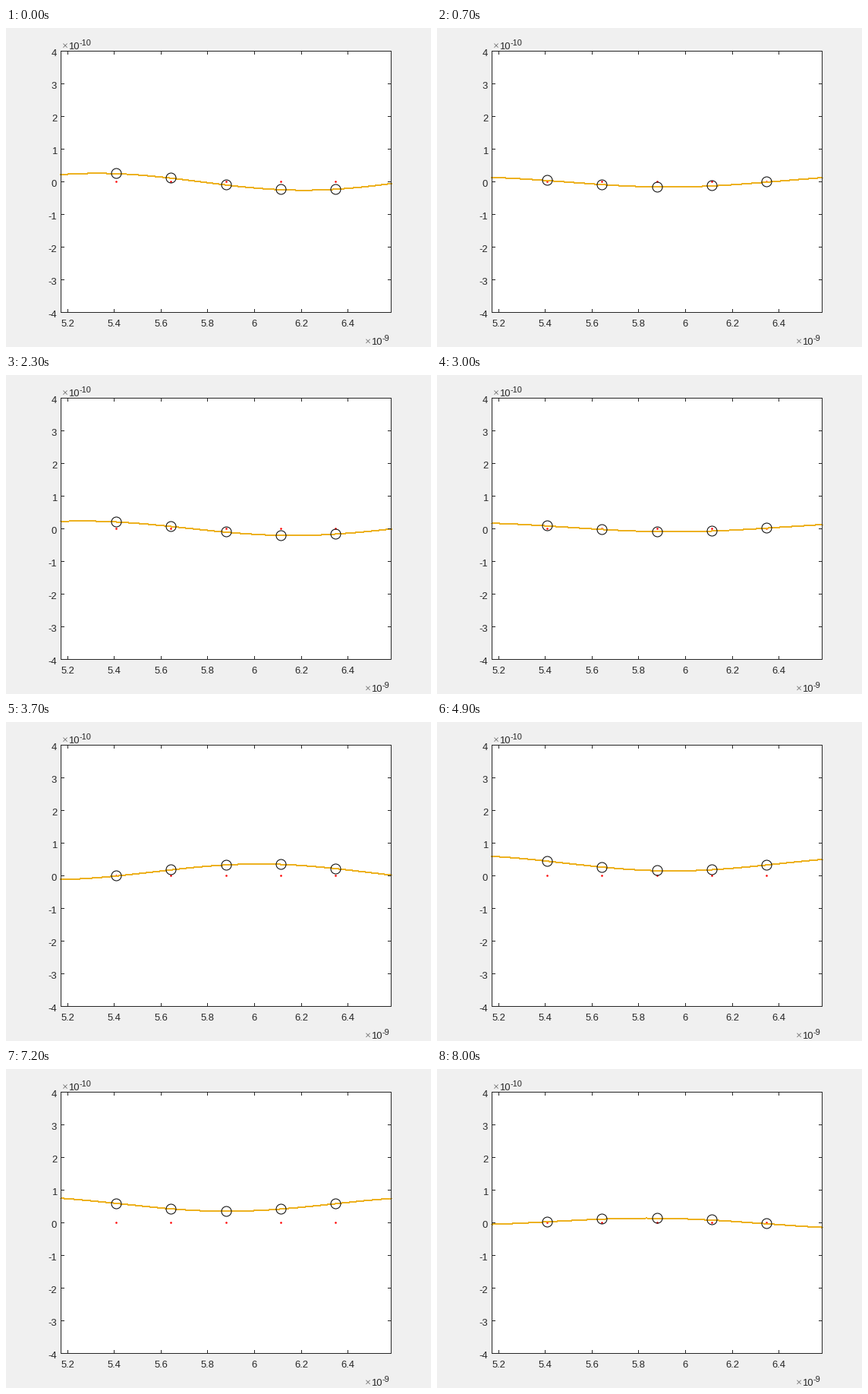
A matplotlib script that plays this animation: 560 px wide and 420 px high, repeating every 8100 ms.

```python
import numpy as np
import matplotlib.pyplot as plt
from matplotlib.animation import FuncAnimation
from matplotlib.patches import Circle, Rectangle

W, H, DPI = 560, 420, 80
PT = 72 / DPI                      # points per pixel
INK = "#262626"
LEFT, RIGHT, TOP, BOTTOM = 72.5, 507.5, 30.5, 374.5
ZERO, UNIT = 202.5, 43             # pixel row of zero, pixels per 1e-10
CENTRE, SPACING = 290.0, 72.25     # middle atom and lattice spacing
PHASE_STEP = np.radians(46.5)      # wave phase per lattice spacing
FRAMES, INTERVAL = 81, 100

plt.rcParams["font.family"] = "Liberation Sans"
plt.rcParams["path.snap"] = False


def bump(t, centre, width, power=2):
    return np.exp(-abs((t - centre) / width) ** power)


def swing(t, peak, degrees_per_step):
    return np.cos(np.radians(degrees_per_step * (t - peak)))


def height(x, t):
    """Displacement in pixels: a beating short wave on a long swell."""
    s = (x - CENTRE) / SPACING
    swell = 0.2 + 30 * (bump(t, 66, 21.5) if t < 66 else bump(t, 66, 9, 4))
    tilt = 0.4 - 1.1 * t / FRAMES + 2.05 * bump(t, 64, 7)
    even = (9.6 + 2.5 * bump(t, 13, 6)) * swing(t, 15.3, 15.86)
    odd = 12.3 * bump(t, 0, 39, 2.5) * swing(t, 13.3, 15.5)
    return swell + tilt * s + even * np.cos(PHASE_STEP * s) + odd * np.sin(PHASE_STEP * s)


def to_pixel(v):
    """Centre of the pixel that holds v."""
    return np.floor(v) + 0.5


fig = plt.figure(figsize=(W / DPI, H / DPI), dpi=DPI, facecolor="#f0f0f0")
ax = fig.add_axes([0, 0, 1, 1])
ax.set(xlim=(0, W), ylim=(H, 0))
ax.axis("off")


def label(x, y, text, size=13, ha="left"):
    ax.text(x, y, text, size=size * PT, color=INK, ha=ha, va="baseline")


def stroke(xs, ys, color=INK, width=1.0):
    ax.plot(xs, ys, color=color, lw=width * PT, solid_capstyle="butt",
            solid_joinstyle="miter", zorder=5)


def power_of_ten(x, y, exponent):
    for d in (-2.6, 2.6):
        stroke([x - 2.6, x + 2.6], [y - 4.5 - d, y - 4.5 + d], "#707070", 0.8)
    label(x + 4.5, y, "10")
    label(x + 19, y - 5, exponent, size=11)


ax.add_patch(Rectangle((LEFT, TOP), RIGHT - LEFT, BOTTOM - TOP, fc="white", ec="none", zorder=0))
stroke([LEFT, RIGHT, RIGHT, LEFT, LEFT, RIGHT], [TOP, TOP, BOTTOM, BOTTOM, TOP, TOP])

for i in range(7):
    x = to_pixel(81.3 + 61.55 * i)
    stroke([x, x], [BOTTOM, BOTTOM - 4.5])
    stroke([x, x], [TOP, TOP + 4.5])
    label(x, 393, f"{5.2 + 0.2 * i:.2g}".replace(".0", ""), ha="center")

for v in range(-4, 5):
    y = ZERO - UNIT * v
    stroke([LEFT, LEFT + 4.5], [y, y])
    stroke([RIGHT, RIGHT - 4.5], [y, y])
    label(67.2, y + 6.5, str(v), ha="right")

power_of_ten(78, 27.6, "-10")
power_of_ten(477, 416.8, "-9")

atoms = to_pixel(CENTRE + SPACING * np.arange(-2, 3))
columns = np.linspace(LEFT, RIGHT, 200)
for x in atoms:
    ax.add_patch(Circle((x, ZERO), 1.3, fc="red", ec="none", zorder=2))
rings = [ax.add_patch(Circle((x, ZERO), 6.5, fc="none", ec="black", lw=PT, zorder=4))
         for x in atoms]
wave, = ax.plot([], [], color="#edb120", lw=PT, antialiased=False, zorder=3)


def update(t):
    for ring, x in zip(rings, atoms):
        ring.center = x, to_pixel(ZERO - height(x, t))
    wave.set_data(columns, ZERO - height(columns, t))
    return [*rings, wave]


anim = FuncAnimation(fig, update, frames=FRAMES, interval=INTERVAL, repeat=True, repeat_delay=0)
plt.show()
```
